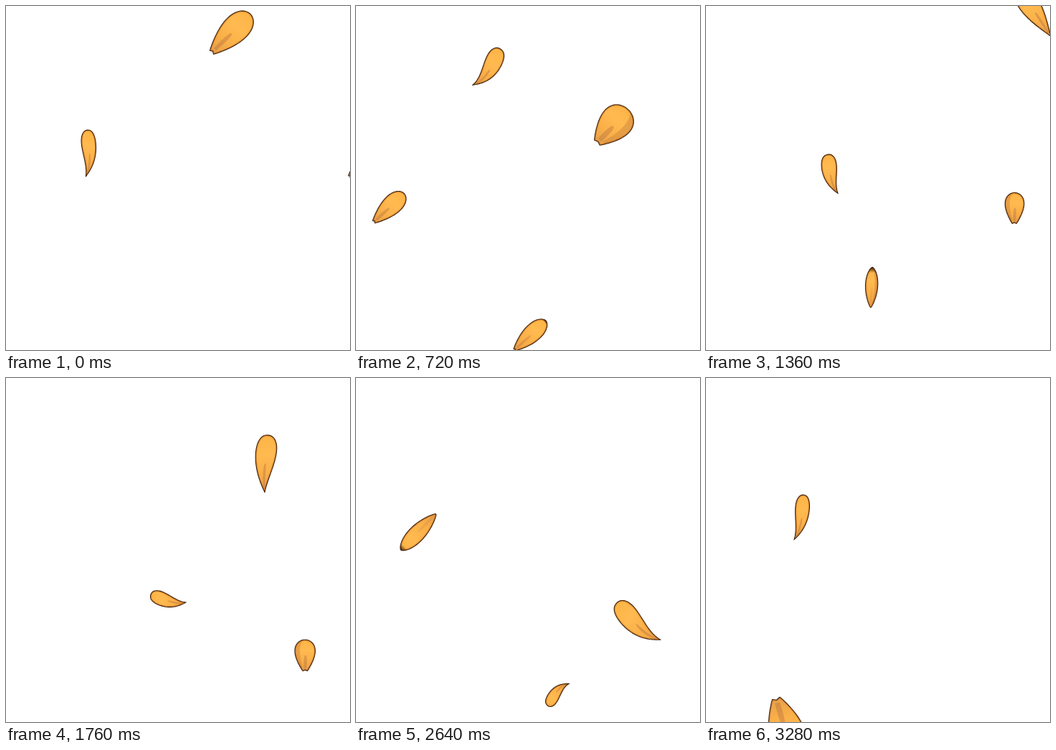
An HTML page with a canvas that plays this animation: 480x480 px, repeating every 3360 ms.

```html
<!DOCTYPE html>
<html lang="en">
<head>
<meta charset="utf-8">
<title>Falling petals</title>
<style>
html, body { margin: 0; width: 100%; height: 100%; overflow: hidden; background: #fff; }
canvas { display: block; width: 480px; height: 480px; }
</style>
</head>
<body>
<canvas id="stage" width="480" height="480"></canvas>
<script>
const LOOP = 3360, STEP = 80;
const ENTRY = { x: -.1, y: .36 };  // px per ms before the first path point
const ctx = document.getElementById('stage').getContext('2d');
const clamp = (v, a, b) => Math.min(b, Math.max(a, v));
const mix = (a, b, k) => a + (b - a) * k;
const ease = k => k * k * (3 - 2 * k);
const at = (t, x, y, angle = 0, curl = 0) => ({ t, x, y, angle, curl });

// Flat petals flip over: width and angle follow one tumble wave that is edge-on at `edge`.
const flat = (size, tumble, ...path) => ({ size, tumble, path });
// Curled petals keep their width ratio and swing from point to point.
const curled = (size, ratio, ...path) => ({ size, ratio, path });

const petals = [
  flat([76, 58], { edge: 400, period: 900, open: .49, angle: -25, swing: -20 },
    at(0, 314, 38), at(400, 147.5, 205), at(720, 46, 281.5)),
  flat([60, 60], { edge: 400, period: 900, open: .43, angle: -59, swing: 18 },
    at(0, 501.5, 218.5), at(400, 328.5, 367), at(720, 243, 459.5)),
  flat([66, 56], { edge: 1480, period: 1500, open: .72, angle: -101, swing: 54, shade: 1 },
    at(400, 391, 44), at(720, 358, 167.5), at(1360, 231, 392.5)),
  flat([43, 44], { edge: 2350, period: 1500, open: .68, angle: -77, swing: -14, shade: -1 },
    at(1360, 430.5, 282), at(2160, 404, 492)),
  flat([62, 82], { edge: 2660, period: 850, open: .7, thin: .29, angle: 141, swing: -91 },
    at(2160, 78, 39), at(2640, 87, 215), at(3280, 110, 486)),
  curled([64, 77], .31,
    at(3280, 130, 194.5, -77, .06), at(3360, 113, 205.5, -87, .06), at(3760, -40, 300, -60, .06)),
  curled([65, 43], .38,
    at(400, 265, 42, -99, .08), at(720, 182.5, 85.5, -51, .09), at(1360, 176.5, 234.5, -106, -.07),
    at(2160, 279.5, 374, -232, -.08), at(2640, 282, 441.5, -224, .1)),
  curled([80, 80], .36,
    at(1360, 459, 9.5, -124), at(2160, 297.5, 227, -50, -.06), at(2640, 394, 340, -141, -.08)),
];

function follow(path, t) {
  const n = path.length - 1, first = path[0], last = path[n];
  const slope = (j, key) => {
    const a = path[Math.max(0, j - 1)], b = path[Math.min(n, j + 1)];
    return (b[key] - a[key]) / (b.t - a.t);
  };
  const drift = (p, vx, vy) => ({ ...p, x: p.x + vx * (t - p.t), y: p.y + vy * (t - p.t) });
  if (t <= first.t) return drift(first, ENTRY.x, ENTRY.y);
  if (t >= last.t) return drift(last, slope(n, 'x'), slope(n, 'y'));

  const i = path.findIndex(p => p.t > t) - 1;
  const p = path[i], q = path[i + 1], span = q.t - p.t, k = (t - p.t) / span;
  const curve = key => mix(p[key], q[key], ease(k))
    + span * k * (1 - k) * ((1 - k) * slope(i, key) - k * slope(i + 1, key));
  return { x: curve('x'), y: curve('y'), angle: mix(p.angle, q.angle, k), curl: mix(p.curl, q.curl, k) };
}

function poseAt({ size, tumble, ratio, path }, t) {
  const first = path[0].t, last = path[path.length - 1].t;
  const pose = follow(path, t);
  const len = mix(size[0], size[1], ease(clamp((t - first) / (last - first), 0, 1)));
  if (!tumble) return { ...pose, len, width: len * ratio, belly: .71, tip: 0, dark: 0, shade: 0 };

  const { edge, period, open, thin = .17, angle, swing, shade = 0 } = tumble;
  const wave = Math.abs(Math.sin(Math.PI * (t - edge) / period));
  const r = mix(thin, open, wave);
  return { ...pose, len, shade, width: len * r, angle: angle + swing * wave,
    belly: clamp(.5 + (r - .2) * .6, .5, .65),
    tip: clamp((r - .25) * .8, 0, .22),
    dark: clamp(1.6 - 3.4 * r, 0, .6) };
}

// Local axes: x runs from tail (0) to head (len), y points to the side
function drawPetal({ x, y, angle, curl, len, width, belly, tip, dark, shade }) {
  const b = clamp(.8 - (belly - .5) * 2, .45, .8), a = b * belly / (1 - belly);
  const mid = s => curl * len * 6.75 * s * (1 - s) ** 2;
  const half = s => width / 2 * ((s / belly) ** a * ((1 - s) / (1 - belly)) ** b + tip * (1 - s) ** 4);

  function shape(s0, s1, left, right) {
    const path = new Path2D(), n = 40;
    const add = (k, side) => {
      const s = mix(s0, s1, (1 - Math.cos(Math.PI * k)) / 2);
      path.lineTo(s * len, mid(s) + half(s) * side(k));
    };
    for (let i = 0; i <= n; i++) add(i / n, left);
    for (let i = n; i >= 0; i--) add(i / n, right);
    if (s0 === 0 && tip > .1) path.lineTo(len * .03, mid(.03));
    path.closePath();
    return path;
  }

  ctx.save();
  ctx.translate(x, y);
  ctx.rotate(angle * Math.PI / 180);
  ctx.translate(-len / 2, 0);
  ctx.lineJoin = 'round';

  const body = shape(0, 1, () => -1, () => 1);
  const fill = ctx.createLinearGradient(0, 0, len, 0);
  ['#e6a04a', '#fab048', '#ffba50', '#fdb446'].forEach((c, i) => fill.addColorStop(i / 3, c));
  ctx.fillStyle = fill;
  ctx.fill(body);

  ctx.save();
  ctx.clip(body);
  if (shade) {
    ctx.fillStyle = 'rgba(190,120,60,.38)';
    ctx.fill(shape(.1, .97, () => shade * .5, () => shade));
  }
  ctx.fillStyle = `rgba(172,104,62,${.36 * clamp((belly - .52) * 8, 0, 1)})`;
  ctx.fill(shape(.08, .5, k => -.35 * (1 - k), k => .4 - .3 * k));
  ctx.strokeStyle = 'rgba(175,90,20,.4)';
  ctx.lineWidth = 3.6;
  ctx.stroke(body);
  if (dark) {
    const cap = ctx.createLinearGradient(len - 14 * dark, 0, len, 0);
    cap.addColorStop(0, 'rgba(50,25,5,0)');
    cap.addColorStop(1, 'rgba(50,25,5,.95)');
    ctx.fillStyle = cap;
    ctx.fill(body);
  }
  ctx.restore();

  ctx.strokeStyle = '#40210b';
  ctx.lineWidth = 1.1;
  ctx.stroke(body);
  ctx.restore();
}

function draw(now) {
  const t = Math.floor((now % LOOP) / STEP) * STEP;
  ctx.fillStyle = '#fff';
  ctx.fillRect(0, 0, 480, 480);
  for (const petal of petals) {
    const end = petal.path[petal.path.length - 1].t;
    drawPetal(poseAt(petal, t));
    if (end > t + LOOP) drawPetal(poseAt(petal, t + LOOP));
  }
}

const start = performance.now();
function tick() {
  draw(performance.now() - start);
  requestAnimationFrame(tick);
}
tick();
</script>
</body>
</html>
```
